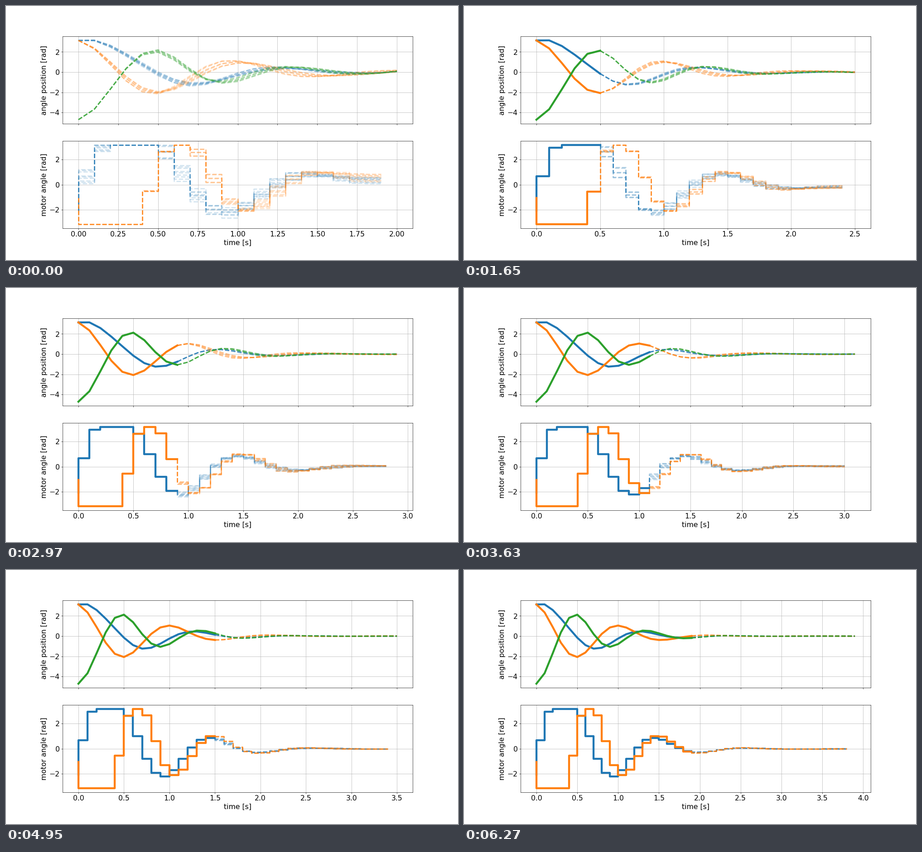
These frames come from a looping animation (998 px wide and 561 px high, 6600 ms). A matplotlib script:

```python
import itertools

import matplotlib.pyplot as plt
import numpy as np
from matplotlib.animation import FuncAnimation

DPI = 62.4
FRAMES, HORIZON, DT = 20, 20, 0.1
PI = np.pi
COLORS = ["#1f77b4", "#ff7f0e", "#2ca02c"]

# Three discs on a shaft, driven by a motor at each end
C = np.array([2.697, 2.66, 3.05, 2.86]) * 1e-3
D = np.array([6.78, 8.01, 8.82]) * 1e-5
INERTIA = 2.25e-4
SCALES = [1, 0.9, 1.1]
TAU = 1e-2
# Move penalty counts in full per scenario, angles by scenario average
DU_COST = 1e-2 * len(SCALES) ** 2

# Set-points the controller applied at every step
MOTOR = np.array([
    [-2.05, 0.67, 2.93, PI, PI, PI, 2.6, 0.98, -0.8, -1.93,
     -2.21, -1.71, -0.82, 0.09, 0.69, 0.85, 0.7, 0.38, 0.05, -0.18],
    [-1.05, -PI, -PI, -PI, -PI, -0.55, 2.62, PI, 2.65, 0.6,
     -1.32, -2.09, -1.66, -0.58, 0.45, 0.99, 0.95, 0.57, 0.13, -0.22],
]).T


def discretise(scale1, scale2, substeps):
    """Step matrices for state (angles, speeds, motors) and set-points."""
    theta = INERTIA * np.array([scale1, scale2, 1.0])[:, None]
    a = np.zeros((10, 10))
    a[:3, 3:6] = np.eye(3)
    a[3:6, :3] = np.array([[-C[0] - C[1], C[1], 0],
                           [C[1], -C[1] - C[2], C[2]],
                           [0, C[2], -C[2] - C[3]]]) / theta
    a[3:6, 3:6] = -np.diag(D) / theta
    a[3, 6] = C[0] / theta[0, 0]
    a[5, 7] = C[3] / theta[2, 0]
    a[6:8, 6:8] = -np.eye(2) / TAU
    a[6:8, 8:] = np.eye(2) / TAU
    z = a * DT / substeps
    eye = np.eye(10)
    step = np.linalg.solve(eye - 2 * z / 3 + z @ z / 6, eye + z / 3)
    step = np.linalg.matrix_power(step, substeps)
    return step[:8, :8], step[:8, 8:]


def run_plant():
    a, b = discretise(1, 1, 50)
    x = PI * np.array([1, 1, -1.5, 1, -1, 1, 0, 0])
    states = [x]
    for u in MOTOR[:-1]:
        x = a @ x + b @ u
        states.append(x)
    return np.array(states)


def response(scale1, scale2, states):
    """Free angle response of every frame and the input-to-angle matrix."""
    a, b = discretise(scale1, scale2, 1)
    x = states @ a.T + MOTOR @ b.T
    free, impulse, power = [], [], b
    for _ in range(HORIZON):
        free.append(x[:, :3])
        impulse.append(power[:3])
        x, power = x @ a.T, a @ power
    gain = np.zeros((3 * HORIZON, 2 * (HORIZON - 1)))
    for j in range(1, HORIZON):
        for i in range(j):
            gain[3 * j:3 * j + 3, 2 * i:2 * i + 2] = impulse[j - 1 - i]
    return np.concatenate(free, axis=1), gain


def solve_box(h, g, limit, sweeps=800):
    """Projected coordinate descent on all scenarios and frames at once."""
    u = np.zeros_like(g)
    grad = g.copy()
    for _ in range(sweeps):
        for i in range(g.shape[-1]):
            new = np.clip(u[..., i] - grad[..., i] / h[:, i, i, None],
                          -limit, limit)
            change = new - u[..., i]
            u[..., i] = new
            grad += change[..., None] * h[:, None, i]
    return u


def predict(states):
    cases = itertools.product(SCALES, repeat=2)
    parts = [response(s1, s2, states) for s1, s2 in cases]
    free = np.array([p[0] for p in parts])
    gain = np.array([p[1] for p in parts])
    n = HORIZON - 1
    diff = np.kron(np.eye(n) - np.eye(n, k=-1), np.eye(2))
    h = gain.transpose(0, 2, 1) @ gain + DU_COST * diff.T @ diff
    g = free @ gain
    g[..., :2] -= DU_COST * MOTOR
    u = solve_box(h, g, PI)
    phi = free + u @ gain.transpose(0, 2, 1)
    shape = (len(parts), FRAMES)
    start = np.broadcast_to(states[:, None, :3], shape + (1, 3))
    first = np.broadcast_to(MOTOR[:, None], shape + (1, 2))
    phi = np.concatenate([start, phi.reshape(shape + (HORIZON, 3))], axis=2)
    u = np.concatenate([first, u.reshape(shape + (n, 2))], axis=2)
    return phi, u


states = run_plant()
phi_pred, motor_pred = predict(states)

plt.rcParams.update({"font.size": 18, "font.family": "DejaVu Sans",
                     "axes.grid": True, "lines.linewidth": 3})
fig, axes = plt.subplots(2, sharex=True, dpi=DPI,
                         figsize=(998.05 / DPI, 561.05 / DPI))
fig.subplots_adjust(left=0.125, right=0.9, bottom=0.125, top=0.88, hspace=0.2)
axes[0].set_ylabel("angle position [rad]")
axes[1].set_ylabel("motor angle [rad]")
axes[1].set_xlabel("time [s]")
axes[0].set_ylim(-1.625 * PI, 1.125 * PI)
axes[1].set_ylim(-1.1 * PI, 1.1 * PI)
fig.align_ylabels()


def add_lines(ax, past, pred, style):
    """Dashed forecast lines and one bold line per variable."""
    lines = []
    for i in range(past.shape[1]):
        look = {"color": COLORS[i], "drawstyle": style}
        for case in pred[..., i]:
            line, = ax.plot([], [], "--", alpha=0.2, zorder=2, **look)
            lines.append((line, case, True))
        line, = ax.plot([], [], lw=5, zorder=2.1, **look)
        lines.append((line, past[:, i], False))
    return lines


lines = (add_lines(axes[0], states[:, :3], phi_pred, "default")
         + add_lines(axes[1], MOTOR, motor_pred, "steps-pre"))


def update(k):
    for line, data, ahead in lines:
        y = data[k] if ahead else data[:k + 1]
        t = (np.arange(len(y)) + (k if ahead else 0)) * DT
        line.set_data(t, y)
    end = (k + HORIZON) * DT
    axes[1].set_xlim(-0.05 * end, 1.05 * end)
    return [item[0] for item in lines]


anim = FuncAnimation(fig, update, frames=FRAMES, interval=330,
                     init_func=lambda: update(0), blit=False, repeat=True)
plt.show()
```
